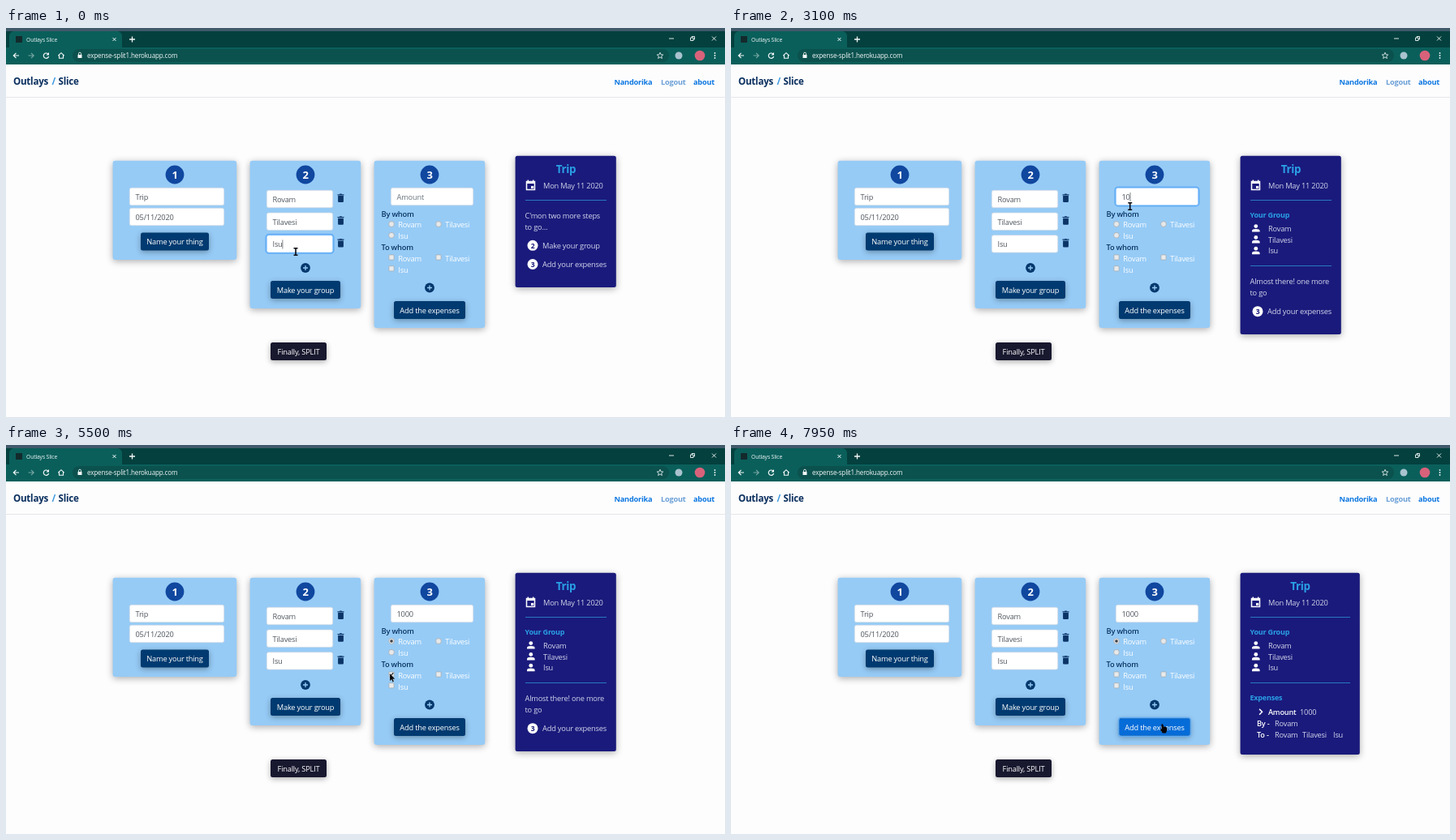
Recreate the animation shown at these times as an HTML page with a canvas. Size 886 px wide and 480 px high, loop 8000 ms.

```html
<!DOCTYPE html>
<html lang="en">
<head>
<meta charset="utf-8">
<title>Outlays Slice</title>
<style>
html, body { margin: 0; width: 100%; height: 100%; overflow: hidden; background: #fdfdfe; }
canvas { display: block; width: 886px; height: 480px; }
</style>
</head>
<body>
<canvas id="stage"></canvas>
<script>
const W = 886, H = 480, LOOP = 8000;
const FONT = '"Open Sans", "Noto Sans", sans-serif';
const GROUP = ['Rovam', 'Tilavesi', 'Isu'];
const NAVY = '#003a70', SKY = '#96cbf6', PANEL = '#1a1a7c', CYAN = '#2aa0e6', PALE = '#d2d6ea';
const TEAL = '#0a5f5b', DEEP = '#04403e';

const canvas = document.getElementById('stage');
const ratio = window.devicePixelRatio || 1;
canvas.width = W * ratio;
canvas.height = H * ratio;
const ctx = canvas.getContext('2d');
ctx.scale(ratio, ratio);

// Pointer stops: time, x, y; it rests between equal positions.
const PATH = [
  [0, 357, 276], [350, 357, 276], [950, 366, 326], [1450, 366, 326],
  [2150, 491.5, 220], [4200, 492, 220], [4600, 474, 240], [4850, 474, 240],
  [5250, 473, 282], [5600, 473, 282], [5900, 474, 296], [6150, 474, 296],
  [6550, 532, 282], [6800, 532, 282], [7100, 531, 321], [7250, 531, 321],
  [7500, 533, 350], [8000, 533, 350]
];
const AT = { group: 1100, focus: 2500, type: 2900, key: 190, by: 4700, to: [5400, 6650, 6000], add: 7700 };

function pointer(t) {
  let i = 1;
  while (i < PATH.length - 1 && PATH[i][0] < t) i++;
  const [t0, x0, y0] = PATH[i - 1], [t1, x1, y1] = PATH[i];
  const p = Math.min(1, (t - t0) / (t1 - t0));
  const e = p * p * (3 - 2 * p);
  return { x: x0 + (x1 - x0) * e, y: y0 + (y1 - y0) * e };
}

function text(str, x, y, size = 9.25, color = '#fff', weight = 400, align = 'left') {
  ctx.font = `${weight} ${size}px ${FONT}`;
  ctx.letterSpacing = `${-0.022 * size}px`;
  ctx.textAlign = align;
  ctx.fillStyle = color;
  ctx.fillText(str, x, y);
  return ctx.measureText(str).width;
}

function rect(x, y, w, h, color) {
  ctx.fillStyle = color;
  ctx.fillRect(x, y, w, h);
}

function box(x, y, w, h, r, fill, stroke, lw = 1) {
  ctx.beginPath();
  ctx.roundRect(x, y, w, h, r);
  if (fill) { ctx.fillStyle = fill; ctx.fill(); }
  if (stroke) { ctx.strokeStyle = stroke; ctx.lineWidth = lw; ctx.stroke(); }
}

function raised(x, y, w, h, r, fill, blur = 8) {
  ctx.save();
  ctx.shadowColor = 'rgba(0,0,0,.32)';
  ctx.shadowBlur = blur * ratio;
  ctx.shadowOffsetY = 2 * ratio;
  box(x, y, w, h, r, fill);
  ctx.restore();
}

function disc(x, y, r, fill, stroke, lw = 1) {
  ctx.beginPath();
  ctx.arc(x, y, r, 0, Math.PI * 2);
  if (fill) { ctx.fillStyle = fill; ctx.fill(); }
  if (stroke) { ctx.strokeStyle = stroke; ctx.lineWidth = lw; ctx.stroke(); }
}

function path(d, x, y, fill, stroke, lw = 1) {
  const p = new Path2D(d);
  ctx.save();
  ctx.translate(x, y);
  if (fill) { ctx.fillStyle = fill; ctx.fill(p); }
  if (stroke) { ctx.strokeStyle = stroke; ctx.lineWidth = lw; ctx.stroke(p); }
  ctx.restore();
}

function browser() {
  rect(0, 0, W, 45, DEEP);
  rect(0, 0, W, 4, '#40596a');
  box(4, 4, 139, 24, [6, 6, 0, 0], TEAL);
  rect(0, 24, W, 21, TEAL);
  box(82, 26, 735, 16, 8, '#0b514e');
  rect(12, 10, 8, 8, '#132a2c');
  text('Outlays Slice', 25, 16.5, 6.8, '#eef6f5');
  const ink = '#f2f8f7';
  path('M-2 -2L2 2M2 -2L-2 2', 133.5, 14, null, ink, 1);
  path('M-3.5 0H3.5M0 -3.5V3.5', 155.5, 14, null, ink, 1.3);
  path('M-3 0H3', 820, 13, null, ink, 0.9);
  path('M-2.5 -1H1V2.5H-2.5ZM-1 -1V-2.5H2.5V1H1', 846, 13, null, ink, 0.9);
  path('M-2.5 -2.5L2.5 2.5M2.5 -2.5L-2.5 2.5', 872.5, 13, null, ink, 0.9);
  path('M3.5 0H-3M0 -3.2L-3.2 0L0 3.2', 12.5, 34, null, ink, 1.2);
  path('M-3.5 0H3M0 -3.2L3.2 0L0 3.2', 31, 34, null, '#76a5a2', 1.2);
  path('M2.5 -1.8A3.2 3.2 0 1 0 3.1 1', 49.5, 34, null, ink, 1.2);
  path('M3.5 -4V-.5H0Z', 49.5, 34, ink);
  path('M-3.7 .2L0 -3.3L3.7 .2M-2.5 -.5V3.2H2.5V-.5', 68, 34, null, ink, 1.1);
  rect(88.5, 33, 5, 4, ink);
  path('M-1.5 0V-1.3A1.5 1.5 0 0 1 1.5 -1.3V0', 91, 33, null, ink, 0.9);
  text('expense-split1.herokuapp.com', 100, 37, 8.1, ink);
  path('M0 -3.8L1.1 -1.2L3.8 -1L1.7 .8L2.4 3.5L0 2L-2.4 3.5L-1.7 .8L-3.8 -1L-1.1 -1.2Z', 806, 34, null, ink, 0.8);
  disc(829, 34, 4.5, '#a9c3cf');
  disc(855, 34, 6.3, '#d8627a');
  for (const y of [31, 34, 37]) disc(873.5, y, 0.9, ink);
}

function header() {
  rect(0, 45, W, 435, '#fdfdfe');
  rect(0, 85, W, 1, '#e4e6ea');
  text('Outlays', 9, 70, 11.6, '#0a2f5e', 700);
  text('/', 56.5, 70, 11.6, '#3f9ade', 700);
  text('Slice', 64.5, 70, 11.6, '#0a2f5e', 700);
  text('Nandorika', 749.5, 69.5, 9.2, '#0b76e0', 700);
  text('Logout', 807, 69.5, 9.2, '#6a9fd6', 700);
  text('about', 847, 69.5, 9.2, '#0b76e0', 700);
}

function card(x, w, h, n) {
  raised(x - 0.4, 163.7, w + 0.6, h + 0.4, 3, SKY);
  disc(x + w / 2, 181, 11.4, '#10479f');
  text(n, x + w / 2, 186, 13, '#fff', 700, 'center');
}

function input(x, y, w, value, focus, caret, color = '#50575e') {
  if (focus) box(x - 0.5, y - 0.5, w + 1, 22.8, 3.5, null, '#62adf3', 2.2);
  box(x + 0.3, y + 0.3, w - 0.6, 21.4, 2.5, '#fff', focus ? '#80bdff' : '#ced8e2', 0.7);
  const tw = text(value, x + 7.5, y + 15, 9.25, color);
  if (caret) rect(x + 7.5 + tw, y + 6, 0.7, 11, '#495057');
}

function button(x, y, w, label, state) {
  const fill = { idle: NAVY, lit: '#066cd8', hover: '#0a62c6' }[state];
  raised(x, y, w, 22, 2.5, fill, 7);
  if (state !== 'idle') {
    box(x - 0.3, y - 0.3, w + 0.6, 22.6, 3, null, '#62adf3', 1.8);
    ctx.setLineDash([1, 1]);
    box(x + 0.5, y + 0.5, w - 1, 21, 2, null, 'rgba(10,53,102,.7)', 0.7);
    ctx.setLineDash([]);
  }
  text(label, x + w / 2, y + 14.6, 9.25, '#fff', 400, 'center');
}

function plus(x, y) {
  disc(x, y, 5.9, '#04386d');
  path('M-3 0H3M0 -3V3', x, y, null, SKY, 1.3);
}

function bin(x, y) {
  path('M-4 -4.6H-1.6L-1 -5.3H1L1.6 -4.6H4V-3.4H-4ZM-3.4 -2.7H3.4V4.2Q3.4 5.2 2.4 5.2H-2.4Q-3.4 5.2 -3.4 4.2Z', x, y, '#0b3467');
}

function radio(x, y, on) {
  disc(x, y, 3.4, '#e6e8ea', '#a5adb4', 0.8);
  if (on) disc(x, y, 1.8, '#3b4046');
}

function check(x, y, on) {
  box(x - 3.1, y - 3.1, 6.2, 6.2, 0.8, '#e8eaec', '#a3abb2', 0.8);
  if (on) path('M-2 0L-.6 1.6L2.2 -1.8', x, y, null, '#23282d', 1.3);
}

function steps(t, hand) {
  card(132, 152, 122, '1');
  input(152, 197, 117, 'Trip');
  input(152, 222, 117, '05/11/2020');
  button(166, 252.5, 84, 'Name your thing', 'idle');

  card(301, 136, 182, '2');
  const blink = since => Math.floor((t - since) / 530) % 2 === 0;
  const nameFocus = t < AT.group;
  GROUP.forEach((name, i) => {
    const y = 200 + i * 27.7, focus = i === 2 && nameFocus;
    input(321, y, 82, name, focus, focus && blink(0));
    bin(412.5, y + 9.8);
  });
  plus(369, 296);
  const groupLit = t >= AT.group && t < AT.focus;
  button(326, 312, 86, 'Make your group', groupLit ? (hand ? 'hover' : 'lit') : 'idle');

  card(454, 136, 206, '3');
  const typed = Math.max(0, Math.min(4, Math.floor((t - AT.type) / AT.key) + 1));
  const amount = '1000'.slice(0, typed);
  const focus = t >= AT.focus && t < AT.by;
  const caret = focus && blink(typed ? AT.type + (typed - 1) * AT.key : AT.focus);
  input(474, 197, 102, amount, focus, caret);
  if (!amount) text('Amount', 481.5, 212, 9.25, '#6c757d');
  text('By whom', 462.5, 232.5, 9.3, '#0a3564', 600);
  text('To whom', 462.5, 274, 9.3, '#0a3564', 600);
  const spots = [[475, 0], [533, 0], [475, 13.8]];
  spots.forEach(([x, dy], i) => {
    radio(x, 242 + dy, i === 0 && t >= AT.by);
    text(GROUP[i], x + 8.3, 246.3 + dy);
    check(x, 283 + dy, t >= AT.to[i] && t < AT.add);
    text(GROUP[i], x + 8.3, 288 + dy);
  });
  plus(522, 320.5);
  button(478, 337, 88, 'Add the expenses', t >= AT.add ? 'lit' : 'idle');

  raised(326, 388, 69, 22, 2.5, '#18182f', 7);
  text('Finally, SPLIT', 360.5, 402.6, 9.25, '#fff', 400, 'center');
}

function badge(n, y, label) {
  disc(649, y, 6.5, '#fff');
  text(n, 649, y + 3.2, 8.6, PANEL, 700, 'center');
  text(label, 661, y + 3.7, 9.3, PALE);
}

function summary(t) {
  const grouped = t >= AT.group, done = t >= AT.add;
  const w = done ? 147 : 124, h = done ? 224 : grouped ? 220 : 162;
  const rule = y => rect(640, y, w - 24, 0.9, '#2b83c6');
  raised(627.6, 157.8, w + 0.2, h + 0.2, 2.5, PANEL);
  text('Trip', 628 + w / 2, 178.5, 13.4, CYAN, 700, 'center');
  path('M-5 -4.5H5V5.5H-5ZM-3.2 -6.5V-4M3.2 -6.5V-4', 646.5, 194, null, '#fff', 1.5);
  rect(641.5, 189, 10, 3, '#fff');
  rect(647, 195, 3.2, 3, '#fff');
  text('Mon May 11 2020', 662, 198, 9.25, PALE);
  rule(212);
  if (!grouped) {
    text("C'mon two more steps", 639.5, 235, 9.25, PALE);
    text('to go...', 639.5, 249, 9.25, PALE);
    badge('2', 268.3, 'Make your group');
    badge('3', 291.5, 'Add your expenses');
    return;
  }
  text('Your Group', 639.5, 233.5, 9, CYAN, 700);
  GROUP.forEach((name, i) => {
    const y = 247 + i * 13.8;
    disc(646.8, y - 2.4, 2.4, '#fff');
    path('M-4.8 4.6V3.4Q-4.8 1 0 1Q4.8 1 4.8 3.4V4.6Z', 646.8, y, '#fff');
    text(name, 662, y + 3.8, 9.25, PALE);
  });
  rule(293);
  if (!done) {
    text('Almost there! one more', 639.5, 316.3, 9.25, PALE);
    text('to go', 639.5, 330.3, 9.25, PALE);
    badge('3', 349.7, 'Add your expenses');
    return;
  }
  text('Expenses', 639.5, 315, 9, CYAN, 700);
  path('M-1.7 -3.4L1.7 0L-1.7 3.4', 652.8, 329.3, null, '#fff', 1.5);
  text('Amount', 662, 333, 9.2, '#fff', 600);
  text('1000', 701, 333, 9.25, PALE);
  text('By -', 648, 347, 9.2, '#fff', 600);
  text(GROUP[0], 670, 347, 9.25, PALE);
  text('To -', 648, 361, 9.2, '#fff', 600);
  [670, 704, 742].forEach((x, i) => text(GROUP[i], x, 361, 9.25, PALE));
}

const inside = (p, x, y, w, h) => p.x >= x && p.x <= x + w && p.y >= y && p.y <= y + h;

function drawPointer(p, hand) {
  const beam = inside(p, 321, 255, 82, 23) || inside(p, 474, 197, 102, 25);
  if (beam) {
    path('M-2.5 -4.3H2.5M0 -4.3V4.3M-2.5 4.3H2.5', p.x, p.y, null, '#0a0a12', 1.6);
  } else if (hand) {
    path('M-2.6 -5.2Q-1.4 -6.4 -.5 -4.8L.2 -2.4Q3.4 -2.8 4.2 -.8L4.2 2.4L2.8 5.4H-1.2L-3.8 1.8Q-4.4 .2 -2.4 .2Z', p.x, p.y, '#05050a');
  } else {
    path('M0 0V9.2L2.1 7.3L3.5 10.4L5 9.7L3.6 6.7H6.4Z', p.x, p.y, '#05050a', 'rgba(255,255,255,.45)', 0.4);
  }
}

function draw(t) {
  const p = pointer(t);
  const hand = inside(p, 326, 312, 86, 22) || inside(p, 478, 337, 88, 22);
  browser();
  header();
  steps(t, hand);
  summary(t);
  drawPointer(p, hand);
}

const start = performance.now();
function tick() {
  draw((performance.now() - start) % LOOP);
  requestAnimationFrame(tick);
}
tick();
</script>
</body>
</html>
```
